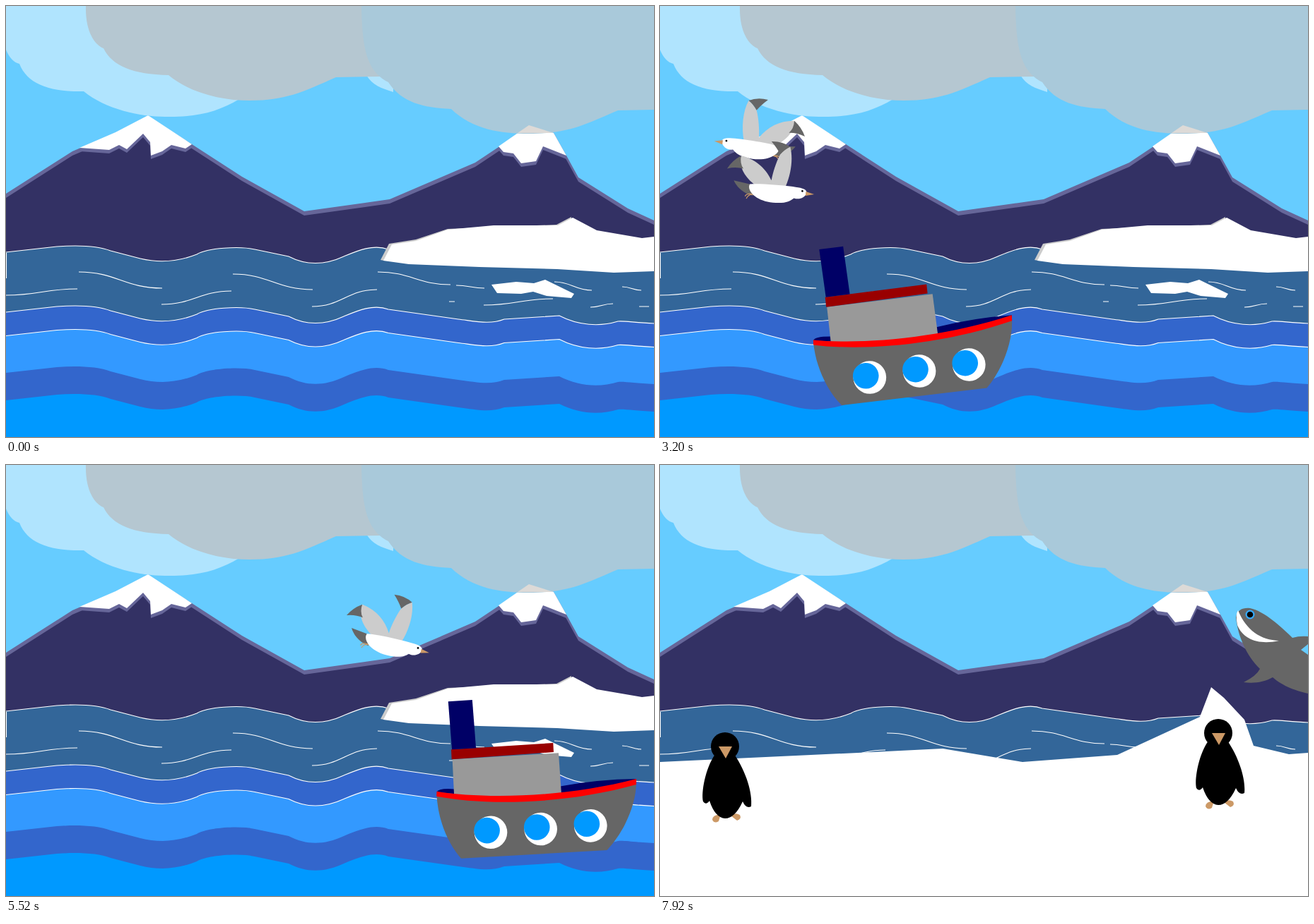
Animation, 917 px wide and 611 px high, one loop 8 s. Source, as an HTML page:

```html
<!DOCTYPE html>
<html lang="en">
<head>
<meta charset="utf-8">
<title>Polar sea</title>
<style>
html, body { margin: 0; width: 100%; height: 100%; overflow: hidden; background: #6cf; }
svg { display: block; width: 100vw; height: 100vh; }
.tan { fill: #c96; }
.grey { fill: #666; }
.navy { fill: #006; }
.line { fill: none; stroke: #fff; stroke-width: 1.1; }
</style>
</head>
<body>
<svg viewBox="0 0 917 611">
  <defs>
    <path id="ridge" d="M0 266L94 206L155 180L201 156L263 196L334 242L422 291L543 274L664 222L697 200L740 169L775 180L793 212L810 243L880 287L917 304V420H0z"/>
    <path id="caps" d="M104 201L155 179L201 155L263 196L254 202L234 197L221 206L205 212L204 193L194 181L171 203L160 197L146 204zM697 199L740 169L775 180L793 212L760 199L750 220L729 223L718 209L704 207z"/>
    <path id="wave" d="M0 349L72 341C100 339 130 340 148 347L190 358C215 364 240 364 270 352C285 343 330 340 352 345L400 355C425 368 450 368 478 355C497 347 520 337 541 345L640 359C665 362 685 367 705 359L783 354C810 368 840 370 866 362C875 361 890 364 917 365"/>
    <!-- left-facing gull, beak tip at the origin -->
    <g id="gull">
      <path class="grey" d="M92 -6L115 -9C110 0 100 8 86 10z"/>
      <path d="M80 9Q92 6 95 15M86 8Q96 7 97 12" fill="none" stroke="#c96" stroke-width="1.2"/>
      <path fill="#ccc" d="M42 -5C35 -25 34 -48 40 -64Q47 -60 53 -52C58 -40 61 -25 62 -14C72 -32 90 -43 108 -45C111 -30 100 -14 82 -4z"/>
      <path class="grey" d="M40 -64Q52 -71 67 -69Q58 -60 53 -52Q47 -60 40 -64zM108 -45Q120 -37 126 -25Q114 -29 103 -27Q109 -34 108 -45z"/>
      <path fill="#fff" d="M18 -7C30 -9 74 -9 92 -6C96 3 82 17 57 17C40 17 33 13 28 8C20 10 13 6 11 0C10 -4 13 -6 18 -7z"/>
      <path class="tan" d="M0 0L12 -3L12 3z"/>
      <circle cx="17" cy="-3" r="1.4"/>
    </g>
    <g id="penguin">
      <path class="tan" d="M86 495Q74 496 74 503Q77 509 83 505zM100 497Q106 492 113 496Q116 502 109 504z"/>
      <circle cx="92" cy="399" r="20"/>
      <path d="M78 410C64 430 58 465 61 477Q65 483 70 476Q78 500 92 501Q106 501 117 477Q122 488 129 484C131 465 122 435 105 410z"/>
      <path class="tan" d="M83 399H102L93 416z"/>
    </g>
  </defs>

  <rect width="917" height="611" fill="#6cf"/>
  <use href="#ridge" fill="#669"/>
  <use href="#ridge" y="6" fill="#333164"/>
  <use href="#caps" y="5" fill="#669"/>
  <use href="#caps" fill="#fff"/>

  <path fill="#b0e4fe" d="M0 0V62Q7 79 19 82C30 110 60 122 110 121C140 146 190 157 225 157C270 158 300 150 330 132L480 60L510 98C518 112 532 117 548 122V0z"/>
  <path fill="#b5c7d1" d="M113 0C112 35 125 55 138 60C150 85 180 97 230 98C260 123 305 134 345 134C395 134 420 122 467 101L530 100L560 0z"/>
  <path fill="#a9c9da" d="M503 0C504 60 510 92 541 108C560 137 590 144 630 146C660 175 700 181 740 181C800 181 825 165 866 148L917 147V0z"/>
  <path fill="#dddad7" d="M724 180L740 169L775 180z"/>

  <g id="sea"></g>
  <path class="line" id="ripples"/>

  <g id="voyage">
    <path fill="#ccc" d="M530 360L542 337L580 331L625 316L779 310L800 299L800 345L535 361z"/>
    <path fill="#fff" d="M534 361L546 338L580 333L625 317L690 311L781 311L802 300L836 318L900 329L917 327V376L860 378L780 373L670 370L570 366zM687 395L722 391L747 393L763 388L804 408L800 414L765 411L746 405L729 408L695 407z"/>
    <g id="boat">
      <path class="navy" d="M83 473Q85 467 108 468L259 460Q310 449 365 447V455L200 481z"/>
      <path fill="#999" d="M104 426L254 413L260 476L108 480z"/>
      <path fill="#900" d="M102 412L246 399L247 412L103 426z"/>
      <path class="navy" d="M96 344L130 341L137 409L103 412z"/>
      <path class="grey" d="M83 475C150 484 260 481 365 451C366 485 348 525 326 549L120 566C100 545 85 510 83 475z"/>
      <path fill="red" d="M83 472C150 481 260 477 365 447V455C260 487 150 490 83 479z"/>
      <path fill="#fff" id="rims"/>
      <path fill="#09f" id="panes"/>
    </g>
    <use id="leftward" href="#gull"/>
    <use id="rightward" href="#gull"/>
  </g>

  <g id="shore">
    <g id="shark">
      <path class="grey" d="M815 216C817 205 825 202 835 203C855 207 880 230 895 245Q905 242 917 243V254L907 262L917 269V324C890 318 875 308 867 301C855 308 840 310 826 308Q844 299 849 289C832 273 818 245 815 216z"/>
      <path fill="#fff" d="M818 206C830 235 850 248 876 249C850 255 826 249 817 227Q814 212 818 206z"/>
      <circle cx="835" cy="212" r="6.5" fill="#3af"/>
      <circle cx="835" cy="212" r="4.3"/>
    </g>
    <path fill="#fff" d="M0 421L280 408L400 402L513 421L647 411L764 357L780 315L798 330L827 361L840 398L890 410L917 408V611H0z"/>
    <use href="#penguin"/>
    <use href="#penguin" x="698" y="-19"/>
  </g>
</svg>
<script>
const LOOP = 8000, STEP = 80, LANDFALL = 7360;
const $ = id => document.getElementById(id);
const trace = (id, d) => $(id).setAttribute('d', d);

// Sea bands: vertical offset, colour, crest line
const bands = [[0, '#369', 1], [85, '#36c', 1], [118.5, '#39f', 1], [171, '#36c', 0], [210, '#09f', 0]];
const wave = $('wave').getAttribute('d');
$('sea').innerHTML = bands.map(([y, color, crest]) =>
  `<g transform="translate(0 ${y})"><path d="${wave}V620H0z" fill="${color}"/>` +
  (crest ? `<path d="${wave}" class="line"/>` : '') + '</g>').join('');

// Each ripple is one S-curve: x, y, width, drop
const ripples = [[103, 377, 118, 23], [0, 410, 101, -9], [220, 423, 99, -19], [321, 380, 113, 22],
  [433, 426, 92, -24], [526, 377, 103, 18], [637, 396, 40, 4], [627, 419, 8, 0], [676, 424, 98, -9],
  [776, 391, 53, 12], [827, 427, 32, -5], [872, 398, 27, 5], [896, 426, 14, 0]];
trace('ripples', 'M.5 350V386' + ripples.map(([x, y, w, h]) =>
  `M${x} ${y}c${w * .45} 0 ${w * .55} ${h} ${w} ${h}`).join(''));

// A row of three portholes
const discs = (x, y, r) => [0, 1, 2].map(i =>
  `M${x + 70.5 * i - r} ${y - 6.5 * i}a${r} ${r} 0 0 1 ${2 * r} 0a${r} ${r} 0 0 1 ${-2 * r} 0`).join('');
trace('rims', discs(161, 528, 23.3));
trace('panes', discs(155.5, 525.5, 18.3));

// Flights: time, x, y, angle
const leftFlight = [[0, 925, 270, -10], [1280, 568, 296, 0], [2400, 290, 228, 9], [4000, -140, 158, 6]];
const rightFlight = [[1200, -15, 269, -2], [2400, 118, 268, 2], [4000, 333, 266, 8.7],
  [4880, 518, 265, 11.4], [6160, 655, 268, 15], [7280, 690, 270, 17]];

// Smooth cubic through the poses
function pose(keys, t) {
  const last = keys.length - 1;
  t = Math.min(Math.max(t, keys[0][0]), keys[last][0]);
  let i = 0;
  while (i < last - 1 && t > keys[i + 1][0]) i++;
  const a = keys[i], b = keys[i + 1], span = b[0] - a[0], u = (t - a[0]) / span;
  const slope = (j, k) => {
    const p = keys[Math.max(j - 1, 0)], q = keys[Math.min(j + 1, last)];
    return (q[k] - p[k]) / (q[0] - p[0]) * span;
  };
  return [1, 2, 3].map(k => {
    const m = slope(i, k), n = slope(i + 1, k), d = b[k] - a[k];
    return a[k] + u * (m + u * (3 * d - 2 * m - n + u * (m + n - 2 * d)));
  });
}

// Steady sailing, slow rise and a rocking hull
function sail(t) {
  const s = t / 1000;
  return [224 + 168.5 * (s - 2.4), 494.2 + .65 * (s - 5) ** 2, 2.5 * Math.cos((s - 1.1) / 5.2 * 2 * Math.PI)];
}

function place(id, [x, y, angle], local = '') {
  $(id).setAttribute('transform', `translate(${x} ${y}) rotate(${angle}) ${local}`);
}

function draw(now) {
  const t = Math.floor(now % LOOP / STEP) * STEP, ashore = t >= LANDFALL, away = LOOP - STEP - t;
  $('voyage').style.display = ashore ? 'none' : '';
  $('shore').style.display = ashore ? '' : 'none';
  place('boat', sail(t), 'translate(-224 -500)');
  place('leftward', pose(leftFlight, t));
  place('rightward', pose(rightFlight, t), 'scale(-1 1)');
  place('shark', [away * .25, away * .08, 0]);
}

let start;
function tick(now) {
  start ??= now;
  draw(now - start);
  requestAnimationFrame(tick);
}
draw(0);
requestAnimationFrame(tick);
</script>
</body>
</html>
```
